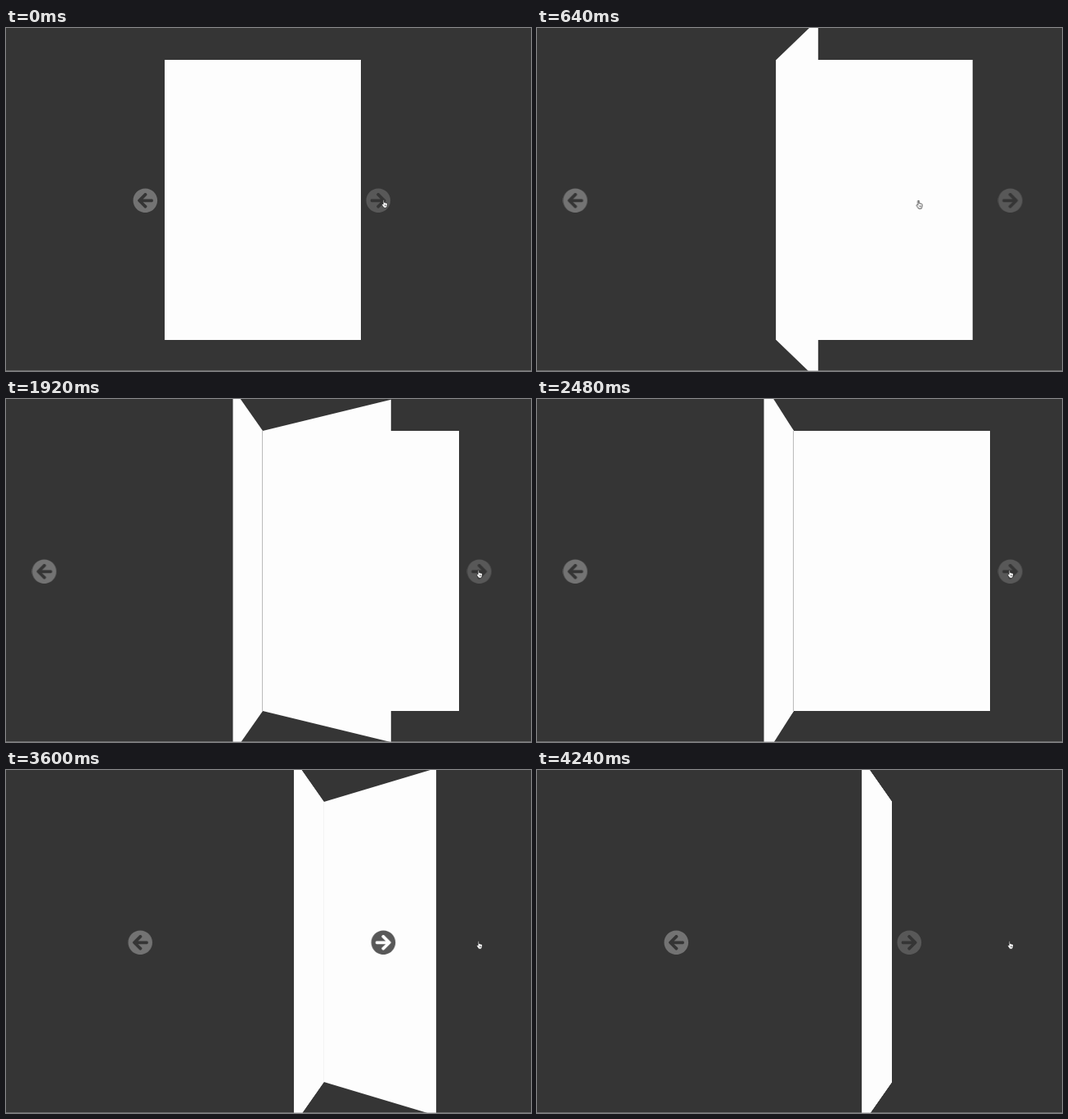
An HTML page that plays this animation: 642 by 420 pixels, repeating every 4.32 s.

```html
<!DOCTYPE html>
<html lang="en">
<head>
<meta charset="utf-8">
<title>Flip book</title>
<style>
  html, body { margin: 0; width: 100%; height: 100%; overflow: hidden; background: #353535; }
  .stage { position: relative; width: 642px; height: 420px; overflow: hidden; }
  .stage > *, .page, .hinge { position: absolute; }

  .book {
    left: 194px; top: 39px; width: 240px; height: 343px;
    perspective: 1029px;
    animation: open 1s ease 121ms both, close 964ms ease 3252ms forwards;
  }
  .page {
    inset: 0;
    background: #fdfdfd;
    transform-origin: left;
    animation: turn 1s ease 121ms both;
  }
  .second { animation-delay: 1590ms; }
  .third { animation-duration: 964ms; animation-delay: 3252ms; }
  .hinge {
    left: -1px; top: 0; width: 1px; height: 100%;
    animation: hinge 4320ms step-end both;
  }

  .button {
    left: 155.4px; top: 195.7px; width: 30.6px; height: 30.6px;
    fill: #737373;
    --shift: -123.5px;
    animation: out 500ms ease 121ms both, back 482ms ease 3252ms forwards;
  }
  .next { left: 440.1px; fill: #585858; --shift: 123.5px; }

  .hand { left: 0; top: 0; width: 8px; height: 11px; animation: hand 4320ms linear both; }
  .edge { left: 0; bottom: 0; width: 100%; height: 1px; background: rgba(160, 160, 160, .5); }

  @keyframes open { from { transform: translateX(0); } to { transform: translateX(120px); } }
  @keyframes close { from { transform: translateX(120px); } to { transform: translateX(240px); } }
  @keyframes turn { from { transform: rotateY(0deg); } to { transform: rotateY(-90deg); } }
  @keyframes out { from { transform: translateX(0); } to { transform: translateX(var(--shift)); } }
  @keyframes back { from { transform: translateX(var(--shift)); } to { transform: translateX(0); } }
  @keyframes hinge {
    0% { background: transparent; }
    16.6% { background: #687070; }
    37% { background: #bbb; }
    77.7%, 100% { background: transparent; }
  }
  @keyframes hand {
    0% { transform: translate(459px, 210px); animation-timing-function: step-end; }
    3.7% { transform: translate(459px, 211px); }
    13.9% { transform: translate(459px, 211px); animation-timing-function: ease-in-out; }
    20.4% { transform: translate(575px, 210px); animation-timing-function: step-end; }
    29.6%, 100% { transform: translate(575px, 209px); }
  }
</style>
</head>
<body>
<div class="stage">
  <div class="book">
    <div class="page third"></div>
    <div class="page second"></div>
    <div class="page"></div>
    <div class="hinge"></div>
  </div>
  <svg class="button" viewBox="0 0 512 512">
    <path id="arrow" fill-rule="evenodd" d="M256 504C119 504 8 393 8 256S119 8 256 8s248 111 248 248-111 248-248 248zm28.9-143.6L209.4 288H392c13.3 0 24-10.7 24-24v-16c0-13.3-10.7-24-24-24H209.4l75.5-72.4c9.7-9.3 9.9-24.8.4-34.3l-11-10.9c-9.4-9.4-24.6-9.4-33.9 0L107.7 239c-9.4 9.4-9.4 24.6 0 33.9l132.7 132.7c9.4 9.4 24.6 9.4 33.9 0l11-10.9c9.5-9.5 9.3-25-.4-34.3z"/>
  </svg>
  <svg class="button next" viewBox="0 0 512 512">
    <use href="#arrow" transform="matrix(-1 0 0 1 512 0)"/>
  </svg>
  <svg class="hand" viewBox="0 0 8 11" fill="#fff" stroke="#222" stroke-width=".8" stroke-linejoin="round">
    <path d="M2.1 .6H3.6V3.6L6.8 4.4Q7.6 4.7 7.5 5.6L7.1 8.2 6.3 10.2H3L.6 6.6Q.5 5.4 1.4 5.5L2.1 6.1Z"/>
    <path d="M4.2 6.4V8.2M5.6 6.4V8.2" fill="none" stroke-width=".6"/>
  </svg>
  <div class="edge"></div>
</div>
<script>
  const LOOP = 4320, STEP = 80;
  const start = performance.now();
  const parts = document.getAnimations();
  parts.forEach(part => part.pause());

  function draw() {
    const time = (performance.now() - start) % LOOP;
    const held = Math.floor(time / STEP) * STEP;
    for (const part of parts) part.currentTime = held;
    requestAnimationFrame(draw);
  }
  draw();
</script>
</body>
</html>
```
